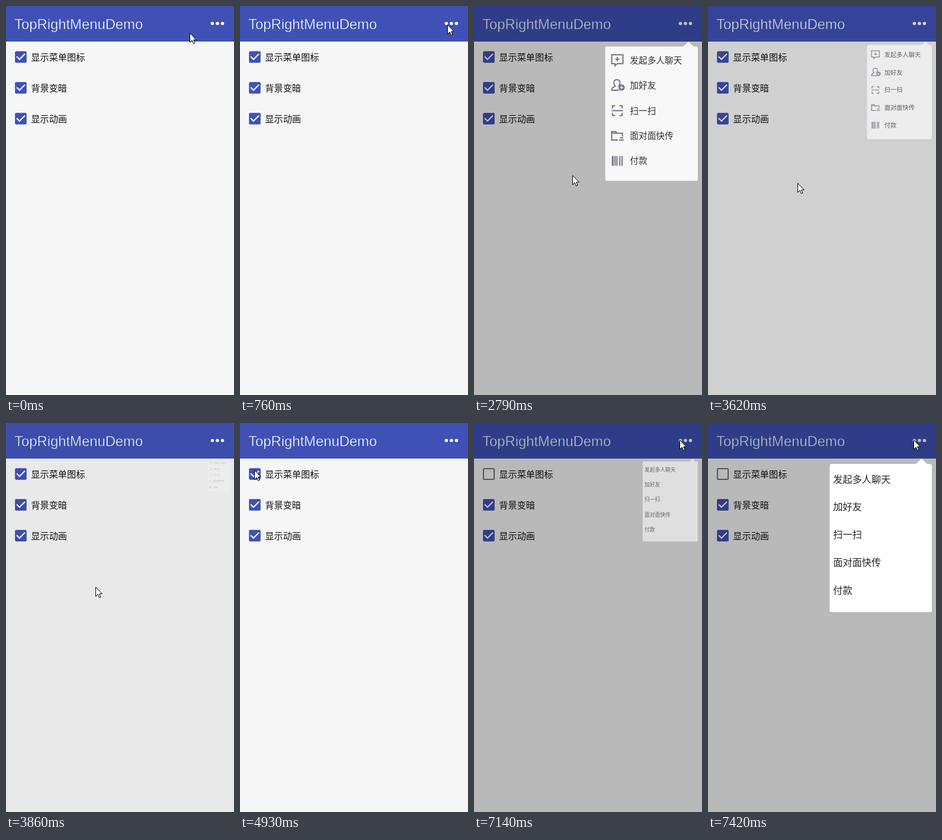
Write an HTML page that moves like this. It is 385 px wide and 656 px high and loops after 8000 ms.

```html
<!DOCTYPE html>
<html lang="zh-CN">
<head>
<meta charset="utf-8">
<title>TopRightMenuDemo</title>
<style>
  html, body { margin: 0; width: 100%; height: 100%; overflow: hidden; background: #f6f6f6; }
  svg { display: block; width: 385px; height: 656px; }
  text { font-family: "Noto Sans CJK SC", "Noto Sans CJK JP", "Noto Sans CJK", sans-serif; font-weight: 300; }
  /* the outline in the bar's colour thins the letters */
  .title { font: 23.8px "Liberation Sans", Arial, sans-serif; fill: #fff; stroke: #3f51b5; stroke-width: .45; }
  .label { font-size: 15.2px; fill: #111; }
  .item { font-size: 16.2px; fill: #222; }
  .icon { fill: none; stroke: #6c6d80; stroke-width: 2.2; }
  .icon .solid { fill: #6c6d80; stroke: none; }
  .icon .cut { stroke: #fff; stroke-width: 1.5; }
</style>
</head>
<body>
<svg viewBox="0 0 385 656">
  <defs>
    <g id="on">
      <rect x="-9.8" y="-9.8" width="19.6" height="19.6" rx="2" fill="#3f51b5"/>
      <path transform="scale(1.11)" fill="#fff" d="M-2 5L-7 0L-5.6 -1.4L-2 2.2L5.6 -5.4L7 -4Z"/>
    </g>
    <rect id="off" x="-9" y="-9" width="18" height="18" rx="1.5" fill="none" stroke="#757575" stroke-width="2.1"/>
  </defs>
  <rect width="385" height="656" fill="#f6f6f6"/>
  <rect width="385" height="60" fill="#3f51b5"/>
  <text class="title" x="14.2" y="39.2">TopRightMenuDemo</text>
  <path d="M348.5 29.5h0M357 29.5h0M365.5 29.5h0" stroke="#fff" stroke-width="5.6" stroke-linecap="round"/>
  <g id="options"></g>
  <rect id="dim" width="385" height="656"/>

  <!-- origin of the menu: its top right corner, the pivot of the zoom -->
  <g id="menu">
    <rect x="-172.5" y="9" width="172.5" height="250" rx="3.5" fill="#fff"/>
    <path d="M-27.5 9.5L-17.5 0L-7.5 9.5Z" fill="#fff"/>
    <g id="items"></g>
    <g id="icons" class="icon">
      <g transform="translate(-150 34.5)">
        <path d="M-10.5 -10H10.5V6.5H0L-4.5 10.5V6.5H-10.5Z"/>
        <path d="M-4 -1.7H4M0 -5.7V2.3"/>
      </g>
      <g transform="translate(-150 81)">
        <path d="M3 9.5H-10.5C-10.5 4 -7 3.5 -4 2C-6 0 -6.5 -2 -6.5 -5C-6.5 -12 5 -12 5 -5C5 -2 4.3 0 2.5 2"/>
        <circle class="solid" cx="8" cy="4.5" r="5.8"/>
        <path class="cut" d="M5 4.5H11M8 1.5V7.5"/>
      </g>
      <g transform="translate(-150 128.5)">
        <path d="M-9 -4V-9H-4M4 -9H9V-4M9 4V9H4M-4 9H-9V4M-10.5 0H10.5"/>
      </g>
      <g transform="translate(-150 175.5)">
        <path d="M1 7.5H-10.5V-8H-3L-1 -5H9.5V1"/>
        <path d="M-10.5 -5H-1M3 7.5H12M5 3.5H11"/>
      </g>
      <g transform="translate(-150 222)">
        <path stroke-width="3.4" d="M-8.5 -9V9"/>
        <path d="M-4.3 -9V9M-.8 -9V9M4.7 -9V9M8.8 -9V9"/>
      </g>
    </g>
  </g>

  <path id="cursor" fill="#fff" stroke="#000" d="M.5 .8V16.4L4.2 12.9L6.6 18.4L9 17.4L6.6 12H11.4Z"/>
</svg>
<script>
  const LOOP = 8000, STEP = 145, DIM = 0.247, UNCHECK = 5480;
  const $ = id => document.getElementById(id);
  const dim = $('dim'), menu = $('menu'), icons = $('icons'), cursor = $('cursor');

  function add(parent, tag, attrs, text = '') {
    const el = document.createElementNS('http://www.w3.org/2000/svg', tag);
    for (const key in attrs) el.setAttribute(key, attrs[key]);
    el.textContent = text;
    return parent.appendChild(el);
  }

  const boxes = ['显示菜单图标', '背景变暗', '显示动画'].map((name, i) => {
    const y = 86 + 52 * i;
    add($('options'), 'text', { class: 'label', x: 42.3, y: y + 6.3 }, name);
    return add($('options'), 'use', { href: '#on', x: 25, y });
  });
  const labels = ['发起多人聊天', '加好友', '扫一扫', '面对面快传', '付款'].map((name, i) =>
    add($('items'), 'text', { class: 'item', y: 40.7 + 46.75 * i }, name));

  const linear = u => u;
  const easeIn = u => u ** 2.2;
  const easeOut = u => 1 - (1 - u) ** 1.7;

  // strokes of the mouse: start, end, x and y reached, easing
  const strokes = [
    [0, 760, 350, 31, linear],
    [2230, 2790, 166, 285, easeIn],
    [2790, 3080, 151, 298, linear],
    [3620, 3990, 150, 232, linear],
    [3990, 4530, 44, 127, linear],
    [4530, 4930, 24, 79, easeOut],
    [5350, 5600, 59, 104, easeIn],
    [5600, 6020, 319, 39, easeOut],
    [6020, 6560, 347, 28, easeOut]
  ];

  // the screen repaints in even steps within each movement
  function progress(t, start, end) {
    const n = Math.round((end - start) / STEP);
    const k = Math.floor((t - start) / (end - start) * n);
    return Math.max(0, Math.min(1, k / n));
  }

  function pointer(t) {
    let x = 310, y = 45;
    for (const [start, end, toX, toY, ease] of strokes) {
      const u = ease(progress(t, start, end));
      x += (toX - x) * u;
      y += (toY - y) * u;
    }
    return [Math.round(x), Math.round(y)];
  }

  // repaints while the menu opens, and the span in which the first one closes
  const opens = [[1720, 1970, 2950], [7140, 7290, 7420]];
  const CLOSE = [3330, 3990];

  function popup(t) {
    const paints = opens.findLast(times => t >= times[0]);
    if (!paints) return [0, 0];
    const k = paints.filter(time => t >= time).length - 1;
    const grown = 1 - 0.46 * (1 - k / 2) ** 2.3;
    if (paints === opens[1]) return [grown, 1];
    const gone = progress(t, ...CLOSE) ** 1.1;
    const zoom = grown * (1 - gone);
    return [zoom, gone > 0.2 ? zoom : 1];
  }

  function draw(t) {
    const [x, y] = pointer(t);
    const [zoom, shade] = popup(t);
    const checked = t < UNCHECK;
    cursor.setAttribute('transform', `translate(${x} ${y})`);
    boxes[0].setAttribute('href', checked ? '#on' : '#off');
    dim.setAttribute('opacity', DIM * shade);
    menu.setAttribute('transform', `translate(378 60) scale(${zoom || 0.01})`);
    menu.setAttribute('opacity', zoom);
    icons.setAttribute('visibility', checked ? 'visible' : 'hidden');
    for (const el of labels) el.setAttribute('x', checked ? -126.5 : -166.7);
  }

  const start = performance.now();
  function tick() {
    draw((performance.now() - start) % LOOP);
    requestAnimationFrame(tick);
  }
  tick();
</script>
</body>
</html>
```
